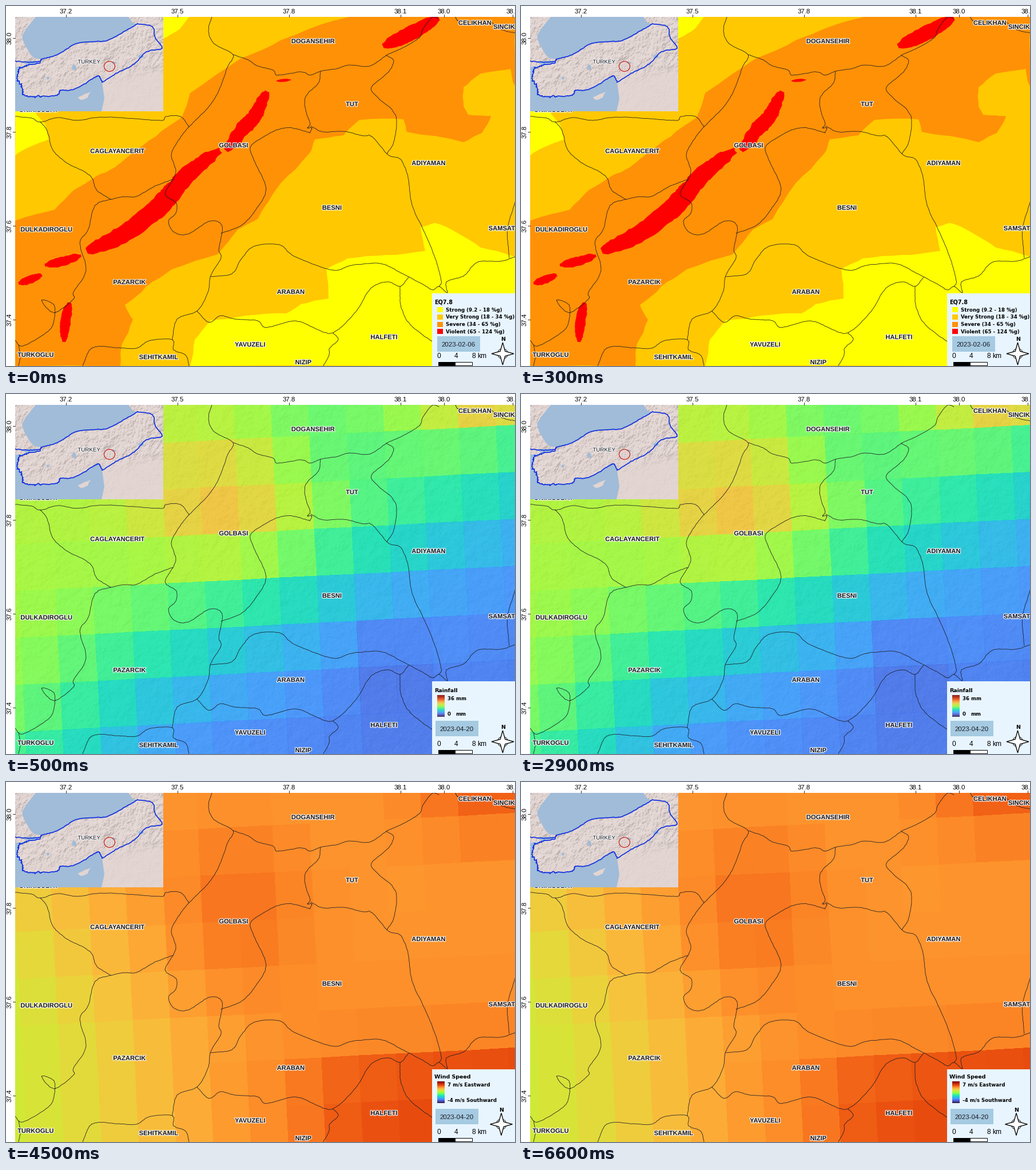
A matplotlib script that plays this animation: 890x629 px, repeating every 8000 ms.

```python
import numpy as np
import matplotlib.pyplot as plt
from matplotlib.animation import FuncAnimation
from matplotlib.patches import Circle, Ellipse, Polygon, Rectangle
from matplotlib.patheffects import withStroke

W, H = 890, 629
PT = 0.72  # points per pixel at 100 dpi
INK = "#1c1c24"
PANEL, GREY = "#e8f5ff", "#c8c8c8"
YELLOW, AMBER, ORANGE, RED = "#ffff00", "#ffc800", "#ff9106", "#ff0000"
SEA, LAND, BLUE = "#a0bcd8", "#e2d5d2", "#1030e0"

rng = np.random.default_rng(7)
fig = plt.figure(figsize=(W / 100, H / 100), dpi=100, facecolor="white")
ax = fig.add_axes([0, 0, 1, 1])
ax.axis("off")
scenes = [[], [], []]


# ---- shape helpers
def rough(pts, amp):
    """Split every segment twice and shift the new points at random."""
    for _ in range(2):
        mid = (pts[:-1] + pts[1:]) / 2
        mid += rng.uniform(-amp, amp, mid.shape)
        out = np.empty((len(pts) + len(mid), 2))
        out[::2], out[1::2] = pts, mid
        pts, amp = out, amp / 2
    return pts


def curve(flat, steps=4):
    """Catmull-Rom curve through key points x, y, x, y ..."""
    p = np.reshape(flat, (-1, 2)).astype(float)
    p = np.vstack([2 * p[0] - p[1], p, 2 * p[-1] - p[-2]])
    t = np.linspace(0, 1, steps, endpoint=False)[:, None]
    out = [b + t / 2 * (c - a + t * (2 * a - 5 * b + 4 * c - d
                                     + t * (3 * b - a - 3 * c + d)))
           for a, b, c, d in zip(p, p[1:], p[2:], p[3:])]
    return np.vstack(out + [p[-2:-1]])


def line(*flat, color=INK, width=0.8, amp=0.5, z=5):
    x, y = rough(curve(flat), amp).T
    ax.plot(x, y, color=color, lw=width * PT, zorder=z, solid_joinstyle="round")


def fill(color, pts, z=1):
    return ax.add_patch(Polygon(pts, fc=color, ec="none", zorder=z))


def area(color, *flat, amp=2.0, z=1):
    p = np.reshape(flat, (-1, 2)).astype(float)
    return fill(color, rough(np.vstack([p, p[:1]]), amp), z)


def streak(half, *flat):
    """Rupture patch: a spine with a swelling half width."""
    p = curve(flat)
    d = np.gradient(p, axis=0)
    normal = np.c_[-d[:, 1], d[:, 0]] / np.hypot(*d.T)[:, None]
    swell = half * (0.3 + 0.7 * np.sin(np.linspace(0, np.pi, len(p)))[:, None] ** 0.5)
    edge = np.vstack([p + normal * swell, (p - normal * swell)[::-1]])
    return fill(RED, rough(edge, half / 8))


def box(x0, y0, x1, y1, color, z, edge="none", width=0):
    return ax.add_patch(Rectangle((x0, y0), x1 - x0, y1 - y0, fc=color, ec=edge,
                                  lw=width * PT, zorder=z))


def text(x, y, s, size, ha="left", z=23, color="black", font="Liberation Sans", **kw):
    return ax.text(x, y + 0.36 * size, s, fontsize=size * PT, ha=ha, va="baseline",
                   color=color, family=font, zorder=z, **kw)


def bold(x, y, s, size=8.6):
    return text(x, y, s, size, font="DejaVu Sans", weight="bold")


def relief(w, h, power, seed):
    """Shaded fractal terrain, about -1..1."""
    noise = np.random.default_rng(seed).standard_normal((h, w))
    f = np.hypot(np.fft.fftfreq(h)[:, None], np.fft.fftfreq(w)[None, :]) + 0.012
    ground = np.fft.ifft2(np.fft.fft2(noise) / f ** power).real
    shade = sum(np.gradient(ground))
    return np.clip(shade / (2 * shade.std()), -1, 1)


def shade_image(shade, strength, x0, y0, z):
    h, w = shade.shape
    rgba = np.zeros((h, w, 4))
    rgba[..., :3] = (shade > 0)[..., None]
    rgba[..., 3] = np.abs(shade) * strength
    return ax.imshow(rgba, extent=(x0, x0 + w, y0 + h, y0), aspect="auto", zorder=z)


# ---- shaking zones
scenes[0] += [
    box(16, 19, W, H, AMBER, 1),
    area(YELLOW, 275, 19, 320, 19, 304, 40, 275, 57, amp=1),
    area(YELLOW, 16, 184, 50, 184, 68, 206, 75, 233, 42, 246, 16, 261, amp=1),
    area(YELLOW, 725, 386, 750, 379, 785, 394, 830, 422, 890, 438, 890, 629, 322, 629,
         330, 583, 358, 549, 420, 541, 490, 537, 515, 521, 564, 511, 560, 460,
         597, 441, 665, 435, 733, 428),
    area(ORANGE, 16, 375, 85, 356, 118, 322, 160, 296, 190, 282, 215, 262, 262, 228,
         307, 195, 322, 152, 410, 92, 480, 60, 535, 38, 600, 19, 890, 19, 890, 108,
         830, 118, 800, 142, 800, 170, 808, 190, 848, 192, 832, 222, 800, 238,
         701, 220, 695, 198, 618, 199, 590, 226, 540, 233, 530, 258, 480, 310,
         440, 372, 405, 391, 370, 434, 290, 460, 245, 490, 208, 522, 222, 548,
         203, 590, 200, 629, 16, 629),
    area(ORANGE, 882, 108, 890, 105, 890, 140, 886, 132, amp=0),
    streak(13, 659, 70, 705, 49, 757, 21),
    streak(2.5, 473, 131, 498, 129),
    streak(13, 385, 253, 412, 217, 436, 190, 457, 149),
    streak(17, 141, 428, 200, 402, 270, 349, 315, 297, 375, 252),
    streak(8, 68, 453, 100, 446, 131, 436),
    streak(7, 22, 485, 42, 478, 63, 470),
    streak(9, 101, 587, 104, 550, 111, 518),
]

# ---- gridded weather fields on a slightly turned lattice
col, row = np.meshgrid(np.arange(-8, 8), np.arange(-1, 8))
gx = 466 + 65.2 * col + 4.1 * row
gy = 76 - 3.3 * col + 81.8 * row
c, r = col[:-1, :-1], row[:-1, :-1]


def bump(height, x, y, sx, sy):
    return height * np.exp(-((c - x) / sx) ** 2 / 2 - ((r - y) / sy) ** 2 / 2)


def step(x):
    return 1 / (1 + np.exp(-x))


rain = (0.145 + 0.385 * step((2.6 - r - 0.35 * c) / 1.2)
        + bump(0.17, -1.7, 0.9, 1.7, 1) + bump(0.17, 5.5, -1, 1.2, 0.45)
        + bump(-0.1, 0.7, -0.5, 1.5, 0.9) + bump(0.11, -7.5, 6.5, 1.8, 1.8)
        + bump(-0.04, 2.3, 4.4, 0.8, 1))
front = -4.6 - 0.8 * np.maximum(0, 4 - r)
wind = (0.63 + 0.092 * np.tanh((c - front) / 3) + 0.015 * step(2 * r - 6)
        + (0.072 + 0.005 * c) * step(c / 0.6) * step((r - 4.6) / 0.25)
        + bump(0.05, -1.6, 1.2, 1.3, 1.2) + bump(0.075, 5.5, -1, 1.4, 0.7))


def field(values, alpha):
    return ax.pcolormesh(gx, gy, values, cmap="turbo", vmin=0, vmax=1, alpha=alpha,
                         zorder=2, antialiased=False, lw=0)


scenes[1] += [box(16, 19, W, H, GREY, 1), field(rain, 0.92),
              shade_image(relief(W - 16, H - 19, 1.8, 3), 0.035, 16, 19, 3)]
scenes[2] += [box(16, 19, W, H, GREY, 1), field(wind, 0.99)]

# ---- district borders
line(360, 19, 354, 43, 364, 66, 397, 85, 388, 105, 372, 148, 353, 178, 320, 211,
     302, 234, 289, 260, 297, 292, 278, 328, 297, 343, 297, 362, 284, 376, 295, 396,
     320, 398, 355, 376, 378, 384, 372, 425, 376, 440, 358, 471, 353, 500, 334, 533,
     299, 547, 291, 583)
line(397, 85, 425, 95, 438, 104, 467, 112, 475, 121, 516, 115, 532, 121, 550, 114,
     580, 109, 600, 103, 636, 105, 665, 86, 690, 75, 722, 56, 729, 40, 745, 20, 757, 22)
line(786, 19, 789, 25, 795, 26)
line(848, 28, 868, 42, 890, 47)
line(550, 114, 546, 135, 524, 158, 524, 183, 532, 205, 527, 213, 535, 213, 531, 222)
line(533, 210, 555, 220, 590, 219, 625, 227, 640, 228, 668, 260, 690, 268, 703, 300,
     710, 348, 733, 398, 750, 440, 761, 480, 757, 490)
line(665, 86, 678, 96, 667, 117, 639, 142, 650, 160, 681, 190, 679, 235, 666, 258)
line(531, 221, 500, 213, 475, 216, 448, 230, 427, 247, 435, 272, 455, 320, 436, 357,
     412, 383, 376, 397)
line(358, 473, 395, 468, 410, 444, 433, 420, 478, 417, 500, 435, 540, 452, 575, 462,
     605, 453, 655, 450, 690, 466, 730, 487, 746, 496, 757, 490, 772, 501, 770, 482,
     800, 472, 815, 455, 830, 446, 865, 446, 890, 438)
line(334, 533, 355, 553, 375, 541, 400, 547, 440, 550, 455, 562, 505, 550, 540, 563,
     572, 571, 612, 534, 638, 493, 668, 482, 689, 490, 704, 474)
line(689, 490, 690, 522, 702, 551, 724, 571, 746, 587)
line(572, 571, 581, 583, 566, 598, 565, 610, 555, 629)
line(134, 629, 145, 603, 160, 595, 195, 597, 228, 598, 250, 585, 291, 583, 293, 601,
     314, 610, 320, 629)
line(183, 338, 156, 348, 144, 390, 129, 415, 140, 462, 118, 500, 118, 512, 84, 536,
     62, 514, 84, 522, 84, 548, 74, 568, 30, 594, 16, 584)
line(22, 592, 25, 612, 22, 629)
line(60, 202, 72, 218, 82, 252, 108, 275, 147, 296, 158, 321, 183, 338)
line(16, 193, 45, 196, 60, 203, 90, 195, 125, 200, 165, 194, 225, 197, 272, 200,
     280, 193, 305, 193, 320, 211)
line(183, 338, 205, 333, 228, 333, 258, 316, 292, 303)
line(890, 343, 877, 390, 880, 440)

halo = [withStroke(linewidth=1.9, foreground="white", alpha=0.85)]
for name, x, y in [
    ("DOGANSEHIR", 537, 61), ("CELIKHAN", 820, 29), ("SINCIK", 871, 36),
    ("TUT", 605, 171), ("CAGLAYANCERIT", 195, 253), ("GOLBASI", 398, 243),
    ("ADIYAMAN", 739, 274), ("BESNI", 570, 352), ("SAMSAT", 867, 388),
    ("DULKADIROGLU", 71, 390), ("PAZARCIK", 216, 482), ("ARABAN", 498, 499),
    ("HALFETI", 661, 578), ("YAVUZELI", 427, 591), ("NIZIP", 520, 622),
    ("SEHITKAMIL", 267, 613), ("TURKOGLU", 52, 609), ("ONIKISUBAT", 57, 181),
]:
    text(x, y, name, 11.2, "center", 7, INK, weight="bold", path_effects=halo)

# ---- overview map
box(16, 19, 275, 184, LAND, 8)
yy, xx = np.mgrid[19:184, 16:275]
hills = relief(259, 165, 1.6, 11) * np.clip((150 - yy - 0.2 * (xx - 140)) / 30, 0.15, 1)
shade_image(hills, 0.18, 16, 19, 9)

north = curve([62, 93, 90, 85, 122, 66, 158, 62, 178, 60, 210, 43, 230, 31])
east = curve([230, 31, 256, 36, 261, 56, 273, 74, 245, 80, 225, 101, 195, 117, 168, 133])
south = curve([168, 133, 162, 122, 150, 128, 118, 146, 95, 147, 90, 156, 62, 158])
west = curve([62, 158, 46, 158, 30, 155, 28, 140, 20, 128, 22, 112, 34, 105, 60, 99])
fill(SEA, np.vstack([curve([52, 19, 34, 42, 29, 58, 46, 88, 62, 93]), north,
                     [[222, 30], [214, 19]]]), 10)
fill(SEA, np.vstack([west[::-1][4:], south[::-1],
                     [[172, 162], [167, 184], [16, 184], [16, 106]]]), 10)
area(SEA, 28, 98, 50, 95, 59, 98, 36, 104, amp=1, z=10)
area(LAND, 125, 160, 148, 150, 143, 160, 130, 164, amp=1, z=11)
for x, y, w, h in [(119, 107, 7, 9), (236, 88, 10, 6), (73, 126, 5, 5), (189, 99, 8, 3)]:
    ax.add_patch(Ellipse((x, y), w, h, fc=SEA, zorder=10))
strait = curve([16, 96, 36, 98, 58, 97, 62, 93])
for coast, amp in [(strait, 0.8), (north, 0.6), (east, 0.8), (south, 0.8), (west, 2.2)]:
    ax.plot(*rough(coast, amp).T, color=BLUE, lw=1.7 * PT, zorder=12)
ax.add_patch(Ellipse((181, 105.5), 19, 17.5, fc="none", ec="#c81e14", lw=1.2 * PT,
                     zorder=13))
text(145, 97, "TURKEY", 9.8, "center", 13, INK, path_effects=halo)

# ---- margins and axis labels
box(0, 0, W, 19, "white", 20)
box(0, 0, 16, H, "white", 20)
for x, s in [(105, "37.2"), (300, "37.5"), (495, "37.8"), (690, "38.1"), (766, "38.0"),
             (885.5, "38.4")]:
    text(x, 9, s, 11.5, "center")
    ax.plot([x, x], [15, 19], color="black", lw=0.8 * PT, zorder=22)
for k in range(4):
    y = 56 + 164 * k
    ax.text(7, y, f"{38 - 0.2 * k:.1f}", fontsize=11.5 * PT, family="Liberation Sans",
            rotation=90, ha="center", va="center", zorder=22)
    ax.plot([12, 16], [y, y], color="black", lw=0.8 * PT, zorder=22)

# ---- legend panel
box(745, 502, W, H, PANEL, 21)
box(756, 622, 815, 628, "white", 22, "black", 1)
box(756, 622, 786, 628, "black", 23)
for k in range(3):
    text(756.5 + 30.5 * k, 611, str(4 * k), 12, "center")
text(824, 611, "km", 12)


def compass(x, y):
    a = np.arange(8) * np.pi / 4
    reach = np.where(np.arange(8) % 2, 6, 19.5)
    star = np.c_[x + reach * np.sin(a), y - reach * np.cos(a)]
    ring = Circle((x, y), 9, fc="none", ec="black", lw=0.8 * PT, zorder=22)
    body = Polygon(star, fc="white", ec="black", lw=1.3 * PT, zorder=23,
                   joinstyle="miter")
    label = text(x + 0.5, y - 25.5, "N", 9.5, "center", font="DejaVu Sans", weight="bold")
    return [ax.add_patch(ring), ax.add_patch(body), label]


def date(x, y, s):
    return [box(x, y, x + 75, y + 27, "#a5cae1", 22),
            text(x + 37, y + 13.5, s, 11.5, "center", color=INK)]


def ramp(y, alpha):
    bar = np.linspace(1, 0, 64)[:, None]
    return [box(754, y, 767, y + 38, GREY, 22),
            ax.imshow(bar, cmap="turbo", extent=(754, 767, y + 38, y), alpha=alpha,
                      aspect="auto", zorder=23)]


scenes[0] += [bold(749, 517.5, "EQ7.8", 9.7)] + date(754, 577, "2023-02-06")
scenes[0] += compass(868.5, 607.5)
for k, (color, s) in enumerate([
    (YELLOW, "Strong (9.2 - 18 %g)"), (AMBER, "Very Strong (18 - 34 %g)"),
    (ORANGE, "Severe (34 - 65 %g)"), (RED, "Violent (65 - 124 %g)"),
]):
    y = 530.5 + 12.8 * k
    scenes[0] += [box(754, y - 4.5, 764, y + 4.5, color, 22), bold(769, y, s)]

scenes[1] += [bold(749, 517.5, "Rainfall", 9.5), bold(772, 531.5, "36 mm"),
              bold(772, 558.5, "0"), bold(786, 558.5, "mm")]
scenes[1] += ramp(526, 0.85) + date(751, 571, "2023-04-20") + compass(868.5, 607.5)

scenes[2] += [bold(749, 514.5, "Wind Speed", 9.5), bold(772, 528.5, "7 m/s Eastward"),
              bold(772, 555.5, "-4 m/s Southward")]
scenes[2] += ramp(523, 0.97) + date(751, 571, "2023-04-20") + compass(866, 598)

ax.set_xlim(0, W)
ax.set_ylim(H, 0)


def draw(i):
    t = i * 500
    now = 0 if t < 500 else 1 if t < 4500 else 2
    for k, group in enumerate(scenes):
        for artist in group:
            artist.set_visible(k == now)
    return []


anim = FuncAnimation(fig, draw, frames=16, interval=500, init_func=lambda: draw(0),
                     repeat=True, repeat_delay=0, blit=False)
plt.show()
```
